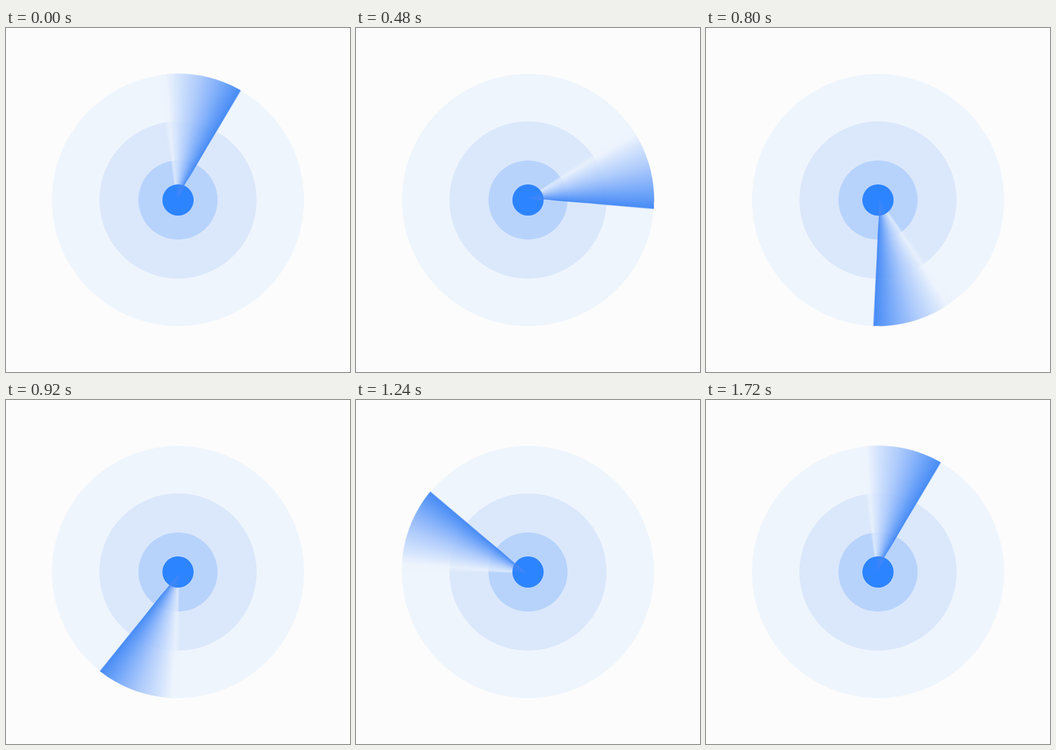
Recreate the animation shown at these times as an HTML page without scripts. Size 748 by 748 pixels, loop 1760 ms.

```html
<!DOCTYPE html>
<html lang="en">
<head>
<meta charset="utf-8">
<title>Radar sweep</title>
<style>
  html, body {
    margin: 0;
    width: 100%;
    height: 100%;
    overflow: hidden;
    background: #fcfcfc;
  }
  .radar {
    position: relative;
    width: 748px;
    height: 748px;
  }
  .radar div {
    position: absolute;
    left: calc(374px - var(--r));
    top: calc(374px - var(--r));
    width: calc(2 * var(--r));
    height: calc(2 * var(--r));
    border-radius: 50%;
  }
  .far  { --r: 274.3px; background: #eff5fd; }
  .mid  { --r: 171.4px; background: #dbe8fb; }
  .near { --r: 85.7px;  background: #b7d3fc; }
  .dot  { --r: 34.3px;  background: #2d84ff; }

  /* The beam's apex sits slightly behind the pivot; its leading edge points up before rotation. */
  .beam {
    --r: 274.6px;
    background: conic-gradient(from -39.2deg at calc(50% - 3.5px) 50%,
      rgba(255, 255, 255, 0) 0deg,
      rgba(237, 243, 252, .65) 4deg,
      rgba(206, 224, 252, .85) 10deg,
      rgba(168, 199, 251, .88) 19deg,
      rgba(128, 174, 250, .9) 27deg,
      rgba(88, 150, 247, .95) 35deg,
      rgba(66, 136, 245, .97) 39.6deg,
      rgba(176, 205, 252, .8) 39.85deg,
      rgba(220, 233, 252, 0) 40.2deg,
      transparent 360deg);
  }
  .glint {
    --r: 34.3px;
    background: conic-gradient(from -39.2deg at calc(50% - 3.5px) 50%,
      rgba(78, 134, 241, 0) 0deg,
      rgba(78, 134, 241, .65) 39.7deg,
      rgba(78, 134, 241, 0) 41.5deg,
      transparent 360deg);
  }
  .beam, .glint {
    animation: sweep 1760ms infinite;
  }
  @keyframes sweep {
    0% {
      transform: rotate(30.1deg);
      animation-timing-function: cubic-bezier(.3333, 0, .6667, .698);
    }
    79.545% {
      transform: rotate(346.5deg);
      animation-timing-function: cubic-bezier(.3333, .503, .6667, .877);
    }
    97.727%, 100% {
      transform: rotate(390.1deg);
    }
  }
</style>
</head>
<body>
<div class="radar">
  <div class="far"></div>
  <div class="mid"></div>
  <div class="near"></div>
  <div class="beam"></div>
  <div class="dot"></div>
  <div class="glint"></div>
</div>
</body>
</html>
```
